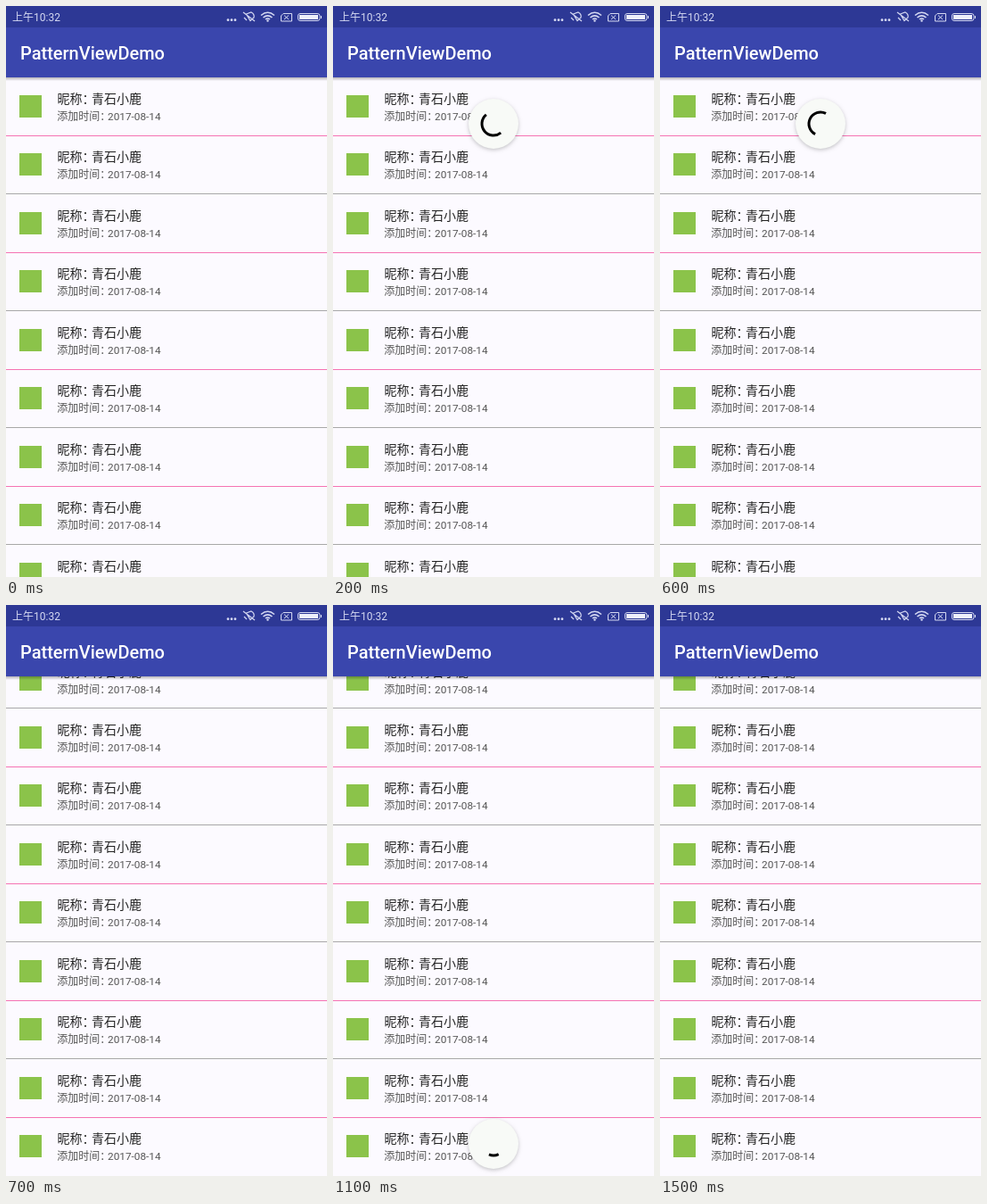
Recreate the animation shown at these times as an HTML page with a canvas. Size 360 by 640 pixels, loop 1600 ms.

```html
<!DOCTYPE html>
<html lang="zh-CN">
<head>
<meta charset="utf-8">
<style>
  html, body { margin: 0; height: 100%; overflow: hidden; background: #fcfaff; }
  canvas { display: block; }
</style>
</head>
<body>
<canvas id="stage" width="360" height="640"></canvas>
<script>
const ctx = document.getElementById('stage').getContext('2d');
const FONT = 'Roboto, "Noto Sans CJK SC", "Noto Sans CJK", sans-serif';
const LOOP = 1600, STEP = 100;
const ROW = 65.45, TOP = 80, SCROLL = 29.5;
const ICON = '#d5d9f2';

function text(str, x, y, size, color, weight = 400) {
  ctx.font = `${weight} ${size}px ${FONT}`;
  ctx.fillStyle = color;
  ctx.fillText(str, x, y);
}

function rect(x, y, w, h, color) {
  ctx.fillStyle = color;
  ctx.fillRect(x, y, w, h);
}

function disc(x, y, r, color) {
  ctx.fillStyle = color;
  ctx.beginPath();
  ctx.arc(x, y, r, 0, 7);
  ctx.fill();
}

function stroke(path, width) {
  ctx.lineWidth = width;
  ctx.strokeStyle = ICON;
  ctx.stroke(new Path2D(path));
}

function row(y) {
  const base = Math.round(y);
  rect(15, base + 20, 25, 25, '#8bc34a');
  text('昵称：', 57.5, base + 29, 14, '#222');
  text('青石小鹿', 96, base + 29, 14, '#222');
  text('添加时间：', 57.3, base + 48, 12, '#555');
  text('2017-08-14', 114, base + 48, 11.8, '#555');
}

function list(scrolled) {
  for (let i = 0; i < 9; i++) {
    const y = TOP + i * ROW - (scrolled ? SCROLL : 0);
    const pink = i % 2 === (scrolled ? 0 : 1);
    row(y);
    if (i > 0) rect(0, Math.floor(y), 360, 1, pink ? '#f573b3' : '#a8a8a8');
  }
}

function statusIcons() {
  for (const x of [249, 253, 257]) disc(x, 15.7, 1.4, ICON);
  // muted bell
  stroke('M269.5 9 L275 7 Q279 9 278 13 L274 16.5 Z M266 7 L279 17 M267 13 L270 16', 1.2);
  // wifi
  stroke('M286 10.5 Q293.5 4 301 10.5 M288.5 13 Q293.5 8.8 298.5 13', 1.6);
  stroke('M291 15 Q293.5 13 296 15', 1.6);
  disc(293.5, 16.5, 1.2, ICON);
  // no SIM
  stroke('M311 8.5 H320.5 V17 H308.5 V11 Z M312 10.5 L317 15 M317 10.5 L312 15', 1);
  // battery
  stroke('M330 8.5 H349 Q352 8.5 352 11 V14 Q352 16.5 349 16.5 H330 Q327.5 16.5 327.5 14 V11 Q327.5 8.5 330 8.5 Z M353.5 11 V14', 1);
  rect(329, 10, 21, 5, '#eef0fb');
}

function header() {
  const shade = ctx.createLinearGradient(0, 80, 0, 84);
  shade.addColorStop(0, 'rgba(0,0,0,.28)');
  shade.addColorStop(1, 'rgba(0,0,0,0)');
  rect(0, 80, 360, 4, shade);
  rect(0, 24, 360, 56, '#3a46ad');
  rect(0, 0, 360, 24, '#2d3895');
  text('上午10:32', 7, 17, 12, ICON);
  statusIcons();
  text('PatternViewDemo', 16, 60, 20, '#fff', 500);
}

function ease(u) {
  u = Math.min(1, Math.max(0, u));
  return 1 - (1 - u * u) ** 5;
}

// The tail catches up in the first half of a cycle, the head runs ahead in the second.
function spinner(y, phase, turn) {
  const cycle = Math.floor(phase), part = phase - cycle;
  const tail = turn + 270 * (cycle + ease(part * 2));
  const head = turn + 270 * (cycle + ease(part * 2 - 1)) + 288;
  ctx.save();
  ctx.shadowColor = 'rgba(0,0,0,.22)';
  ctx.shadowBlur = 4;
  ctx.shadowOffsetY = 1.5;
  disc(180, y, 28, '#f8faf7');
  ctx.restore();
  ctx.beginPath();
  ctx.arc(180, y, 13, tail * Math.PI / 180, head * Math.PI / 180);
  ctx.lineWidth = 3;
  ctx.strokeStyle = '#000';
  ctx.stroke();
}

function draw(now) {
  const t = Math.floor(now % LOOP / STEP) * STEP;
  rect(0, 0, 360, 640, '#fcfaff');
  list(t >= 700);
  header();
  if (t >= 100 && t < 700) spinner(132, 0.705 + (t - 200) / 400, 141 + 0.39 * (t - 200));
  if (t >= 800 && t < 1500) spinner(604, 0.632 + (t - 900) / 301, 197 + 0.39 * (t - 900));
  requestAnimationFrame(() => draw(performance.now() - start));
}

const start = performance.now();
draw(0);
</script>
</body>
</html>
```
